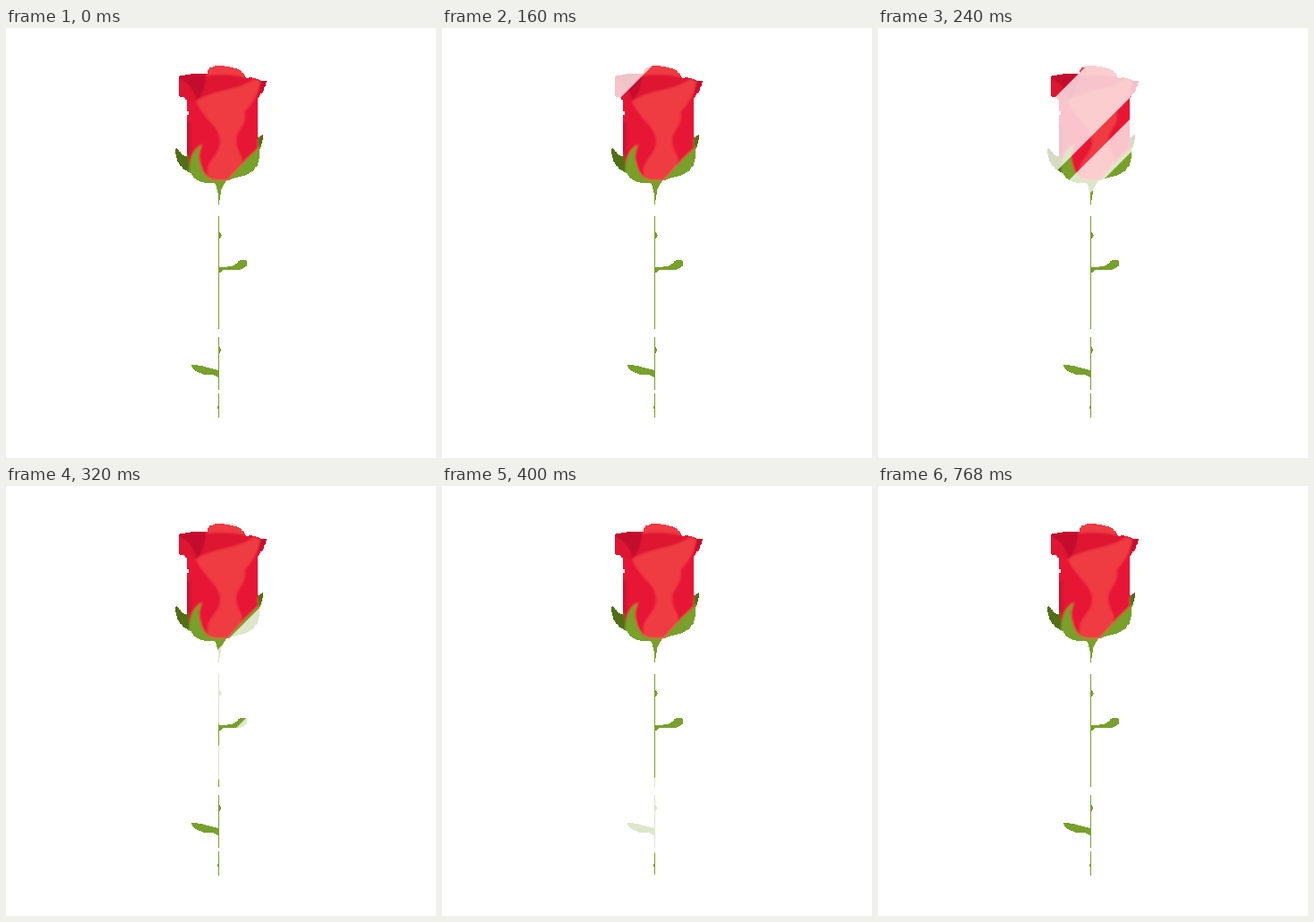
An HTML page for the animation above (0.96 s loop, 480 px wide and 480 px high).

```html
<!DOCTYPE html>
<html lang="en">
<head>
<meta charset="utf-8">
<title>Rose</title>
<style>
  html, body { margin: 0; width: 100%; height: 100%; overflow: hidden; background: #fff; }
  svg { display: block; width: 100vw; height: 100vh; }
  .jag { shape-rendering: crispEdges; }
</style>
</head>
<body>
<svg viewBox="0 0 480 480">
  <defs>
    <clipPath id="bloom"><path class="jag" d="M193 54Q207 50 225 51Q224 42 240 42Q265 44 267 56Q277 54 284 59H291Q288 70 281 78V123L287 118Q287 126 283 135Q285 160 262 166Q250 168 244 172Q239 178 238 198H237Q238 180 232 173Q213 175 205 161Q188 154 189 134H191Q195 142 202 143V97H204V93H202V81L198 77H193Z"/></clipPath>
    <linearGradient id="side"><stop stop-color="#c01030"/><stop offset="1" stop-color="#e81735"/></linearGradient>
    <filter id="soft"><feGaussianBlur stdDeviation=".8"/></filter>
  </defs>

  <g clip-path="url(#bloom)">
    <g filter="url(#soft)">
      <path fill="#e81735" d="M180 30H300V210H180Z"/>
      <path fill="url(#side)" d="M202 105H209V156H202Z"/>
      <!-- inner petals -->
      <path fill="#df1733" d="M190 48H270V62L212 82 190 78Z"/>
      <path fill="#c4112d" d="M194 48H222Q226 66 213 81Q207 62 194 57Z"/>
      <path fill="#ef3b43" d="M224 53V40H268V55Q246 50 224 53Z"/>
      <!-- front petal -->
      <path fill="#ef3b43" d="M212 82Q222 74 247 69Q265 65 278 57L285 61Q278 82 266 94C270 108 257 113 257 126S268 145 262 154L248 172H228C217 148 239 145 239 127S222 104 212 82Z"/>
      <path fill="#c5112d" d="M285 58H293L281 79Q281 70 285 58Z"/>
      <!-- sepals -->
      <path fill="#4f7012" d="M186 130L203 142 206 166 186 160ZM281 124L290 114V134H281Z"/>
      <path fill="#78a02c" d="M219 130Q213 141 217 152Q221 170 237 170H247L268 147 285 131H290V180H205Q200 140 219 130Z"/>
      <path fill="#78a02c" d="M230 172H247V205H230Z"/>
    </g>
  </g>

  <path stroke="#78a02c" stroke-dasharray="126 9 59 4" d="M237.5 210V435"/>
  <g fill="#78a02c">
    <path class="jag" d="M238 228L241 232 238 235Z"/>
    <path class="jag" d="M238 267Q254 267 258 262T269 260Q270 270 255 270H242L238 274Z"/>
    <path class="jag" d="M238 356L240 359 238 363Z"/>
    <path class="jag" d="M207 376Q214 376 222 378T237 382V391Q234 387 226 387T208 381Z"/>
    <path class="jag" d="M237 420L235 423 237 427Z"/>
  </g>

  <path id="glint" fill="#fff" fill-opacity=".75"/>
</svg>
<script>
  // Redraw an outline as small square steps along its curve.
  function jag(path) {
    const len = path.getTotalLength(), n = Math.ceil(len / 2);
    const at = i => {
      const p = path.getPointAtLength(len * i / n);
      return [Math.round(p.x), Math.round(p.y)];
    };
    let [px, py] = at(0), d = `M${px} ${py}`;
    for (let i = 1; i <= n; i++) {
      const [x, y] = at(i);
      d += `H${Math.round((px + x) / 2)}V${y}H${x}`;
      px = x;
    }
    path.setAttribute('d', d + 'Z');
  }
  document.querySelectorAll('.jag').forEach(jag);

  // Two diagonal bands, each between the lines x + y = a and x + y = b.
  const band = (a, b) => `M${a} 0H${b}L${b - 480} 480H${a - 480}Z`;
  const glint = document.getElementById('glint');
  glint.setAttribute('d', band(131, 215) + band(239, 277));

  // The glint hops one stride per tick and reaches the petals on the third.
  const TICKS = 12, TICK = 80, STRIDE = 144;
  const shift = k => `translate(${k * STRIDE}px, 0px)`;
  glint.animate(
    { transform: [shift(-2), shift(TICKS - 2)] },
    { duration: TICKS * TICK, easing: `steps(${TICKS}, end)`, iterations: Infinity }
  );
</script>
</body>
</html>
```
